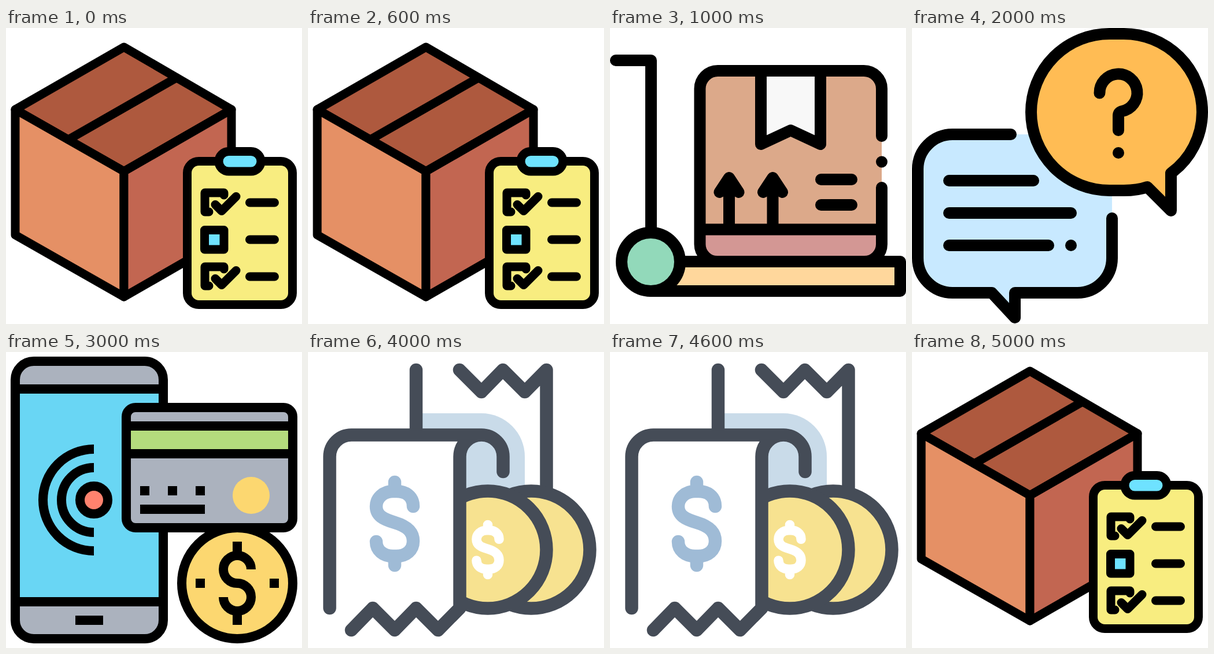
An HTML page that plays this animation: 512x512 px, repeating every 6 s.

```html
<!DOCTYPE html>
<html lang="en">
<head>
<meta charset="utf-8">
<title>Order steps</title>
<style>
  html, body { margin: 0; width: 100%; height: 100%; overflow: hidden; background: #fff; }
  svg { display: block; width: 100vw; height: 100vh; }
  .scene { display: none; fill: none; stroke: #000; stroke-linecap: round; stroke-linejoin: round; }
  .scene.on { display: inline; }
  .flat { stroke: none; }
  .solid { fill: #000; stroke: none; }
</style>
</head>
<body>
<svg viewBox="0 0 512 512">
  <defs>
    <path id="tick" d="M377 289V285H344V318H351M362 305.500L373 316.500L398 291.500"/>
    <path id="arrow" d="M206 348V262M189.500 284L206 259L222.500 284"/>
    <path id="dollar" d="M182 267C182 249 168 241 153 241H147C130 241 118 253 118 267C118 283 130 289 150 295C170 301 182 310 182 327C182 343 170 353 153 353H147C130 353 118 343 118 328M150 225V241M150 353V369"/>
  </defs>

  <g class="scene" id="parcel" stroke-width="15">
    <path fill="#ae593e" d="M204 33L390 141L204 248L16 141Z"/>
    <path fill="#e59065" d="M16 141L204 248V465L16 358Z"/>
    <path fill="#c26651" d="M204 248L390 141V358L204 465Z"/>
    <path d="M295 86L108 193"/>
    <rect x="313.500" y="230.500" width="182" height="248" rx="20" fill="#f8ed80"/>
    <rect x="368" y="213.500" width="73" height="34.500" rx="17.250" fill="#6ee2ff"/>
    <use href="#tick"/>
    <use href="#tick" y="128"/>
    <rect x="343.500" y="349.500" width="33.500" height="33.500" fill="#6ee2ff"/>
    <path d="M421.500 302H464.500M421.500 366H464.500M421.500 430H464.500"/>
  </g>

  <g class="scene" id="trolley" stroke-width="20">
    <rect x="71" y="404" width="431" height="51" fill="#ffd79c"/>
    <rect class="flat" x="155.500" y="74" width="314.500" height="330" rx="31" fill="#dca98a"/>
    <path class="flat" fill="#d39794" d="M155.500 348H470V374A30 30 0 0 1 440 404H185.500A30 30 0 0 1 155.500 374Z"/>
    <path d="M470 187V105A31 31 0 0 0 439 74H186.500A31 31 0 0 0 155.500 105V374A30 30 0 0 0 185.500 404H440A30 30 0 0 0 470 374V276M155.500 348.500H470"/>
    <path fill="#f8f8f8" d="M261 74V201L312.500 177L364 201V74Z"/>
    <use href="#arrow"/>
    <use href="#arrow" x="75.500"/>
    <path d="M365 262H418M365 306H418M10 56H71V354"/>
    <circle class="solid" cx="470" cy="231.500" r="10"/>
    <circle cx="70.500" cy="404.500" r="50.500" fill="#92d9ba"/>
  </g>

  <g class="scene" id="chat" stroke-width="20">
    <path class="flat" fill="#c8e9ff" d="M70 184H346V398A60 60 0 0 1 286 458H178V500L138 458H70A60 60 0 0 1 10 398V244A60 60 0 0 1 70 184Z"/>
    <path d="M171 184H70A60 60 0 0 0 10 244V398A60 60 0 0 0 70 458H138L178 501V458H286A60 60 0 0 0 346 398V329"/>
    <path d="M64 264H210M64 320H275M64 376H236"/>
    <circle class="solid" cx="275" cy="376" r="10"/>
    <path fill="#ffbc54" d="M341.500 10H366.500A135.500 135.500 0 0 1 502 145.500A131 131 0 0 1 448 251V316L407 275Q390 281 366.500 281H341.500A135.500 135.500 0 0 1 341.500 10Z"/>
    <path d="M324.500 112.500A32.500 32.500 0 1 1 363 144Q357 146 357 152V177"/>
    <circle class="solid" cx="357" cy="216" r="10"/>
  </g>

  <g class="scene" id="payment" stroke-width="16" style="stroke-linecap:butt">
    <rect x="16" y="16" width="256" height="480" rx="32" fill="#abb2be"/>
    <rect x="16" y="64" width="256" height="368" fill="#69d6f4"/>
    <path d="M120 464H168M152 168A88 88 0 0 0 152 344M152 200A56 56 0 0 0 152 312"/>
    <circle cx="152" cy="256" r="24" fill="#ff826e"/>
    <circle cx="400" cy="400" r="96" fill="#fcd770"/>
    <path d="M424 376A24 24 0 1 0 400 400A24 24 0 1 1 376 424M400 328V352M400 448V472M328 400H344M456 400H472"/>
    <rect x="208" y="96" width="288" height="208" rx="16" fill="#abb2be"/>
    <rect x="208" y="128" width="288" height="48" fill="#b4dc7d"/>
    <path d="M232 240H248M280 240H296M328 240H344M232 272H344"/>
    <circle class="flat" cx="424" cy="248" r="32" fill="#fcd770"/>
  </g>

  <g class="scene" id="receipt" stroke-width="22.500" style="stroke:#454c57">
    <path class="flat" fill="#c9dbe9" d="M187 106H300A75 75 0 0 1 375 181V260H187Z"/>
    <path d="M187 31V143M262 31L300 69L337 31L375 69L412.500 31V250"/>
    <circle cx="386" cy="342" r="101.500" fill="#f7e290"/>
    <circle cx="311" cy="342" r="101.500" fill="#f7e290"/>
    <path class="flat" fill="#fff" d="M37.500 443V181A38 38 0 0 1 75 143H300A38 38 0 0 0 262.500 181V443L225 481L187 443L150 481L112 443L75 481Z"/>
    <path d="M37.500 443V181A37.500 37.500 0 0 1 75 143.500H300A37.500 37.500 0 0 1 337.500 181V207M300 143.500A37.500 37.500 0 0 0 262.500 181V443L225 481L187 443L150 481L112 443L75 481"/>
    <use href="#dollar" stroke="#9fbbd6"/>
    <use href="#dollar" stroke="#fff" stroke-width="27" transform="translate(311 342) scale(.61 .6) translate(-150 -297)"/>
  </g>
</svg>
<script>
  const order = ["parcel", "trolley", "chat", "payment", "receipt", "parcel"];
  const scenes = document.querySelectorAll(".scene");
  const SCENE_MS = 1000;

  function draw() {
    const current = order[Math.floor(performance.now() / SCENE_MS) % order.length];
    scenes.forEach(scene => scene.classList.toggle("on", scene.id === current));
    requestAnimationFrame(draw);
  }
  draw();
</script>
</body>
</html>
```
